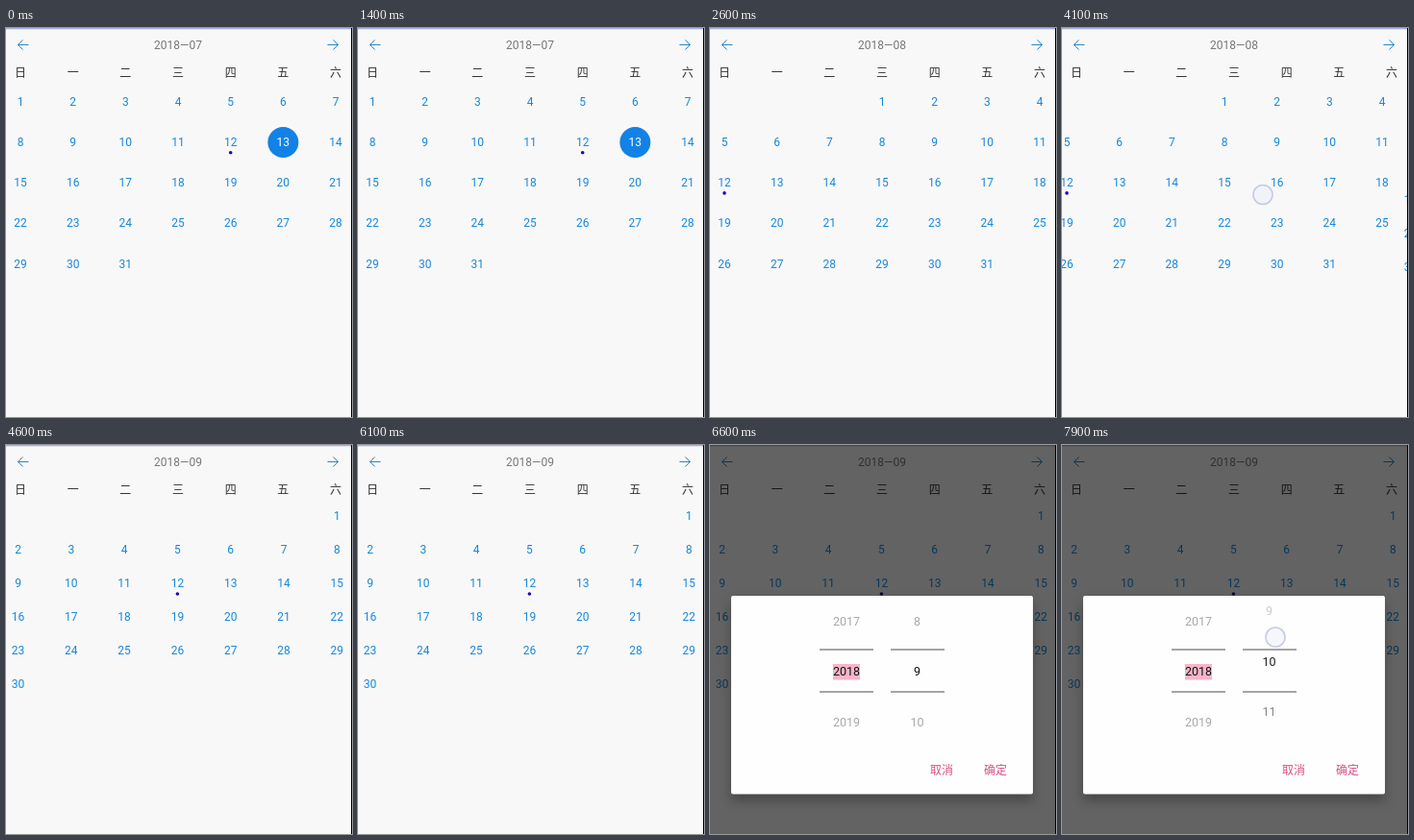
These frames come from a looping animation (360 by 405 pixels, 8000 ms). An HTML page:

```html
<!DOCTYPE html>
<html lang="zh-CN">
<head>
<meta charset="utf-8">
<title>Calendar</title>
<style>
  html, body { margin: 0; width: 100%; height: 100%; overflow: hidden; background: #f8f8f8; }
  svg { display: block; width: 100vw; height: 100vh; }
  text { font: 12px Roboto, "Noto Sans CJK SC", "Noto Sans CJK", sans-serif; text-anchor: middle; }
  .day { fill: #1787d9; }
  .selected { fill: #fff; }
  .weekday { fill: #333; font-weight: 500; }
  .title { fill: #777; }
  .wheel { fill: #111; font-size: 12.5px; }
  .button { fill: #d94f83; font-weight: 500; }
  .arrow { fill: none; stroke: #3585bd; }
  .dialog { filter: drop-shadow(0 7px 6px rgba(0, 0, 0, .28)); }
</style>
</head>
<body>
<svg id="stage" viewBox="0 0 360 405"></svg>
<script>
const LOOP = 8000, TICK = 100, PAGE = 360;
const stage = document.getElementById('stage');

function add(parent, tag, attrs = {}, content = '') {
  const node = document.createElementNS('http://www.w3.org/2000/svg', tag);
  for (const key in attrs) node.setAttribute(key, attrs[key]);
  node.textContent = content;
  return parent.appendChild(node);
}

// Places text with its digits centred on (x, y).
const label = (parent, content, x, y, className) =>
  add(parent, 'text', { x, y: y + 4.3, class: className }, content);

const rect = (parent, x, y, width, height, fill) =>
  add(parent, 'rect', { x, y, width, height, fill });

const months = [
  { days: 31, start: 0, x: 15, y: 76.5, dx: 54.67, dy: 42.2, selected: 13 },
  { days: 31, start: 3, x: 15, y: 76.5, dx: 54.67, dy: 42.2 },
  { days: 30, start: 6, x: 12.5, y: 74, dx: 55.3, dy: 35 }
];

const strip = add(stage, 'g');
months.forEach((month, index) => {
  const page = add(strip, 'g', { transform: `translate(${index * PAGE})` });
  for (let day = 1; day <= month.days; day++) {
    const cell = month.start + day - 1;
    const x = month.x + cell % 7 * month.dx;
    const y = month.y + Math.floor(cell / 7) * month.dy;
    const selected = day === month.selected;
    if (selected) add(page, 'circle', { cx: x, cy: y + .3, r: 16, fill: '#1282e6' });
    label(page, day, x, y, selected ? 'selected' : 'day');
    if (day === 12) add(page, 'circle', { cx: x, cy: y + 11, r: 1.8, fill: '#1800c4' });
  }
});

[...'日一二三四五六'].forEach((name, i) => label(stage, name, 15 + i * 54.67, 47, 'weekday'));
const title = label(stage, '', 179, 17.5, 'title');
add(stage, 'path', { class: 'arrow', d: 'M23.5 17.5H12.5M17.5 12.5l-5 5l5 5' });
add(stage, 'path', { class: 'arrow', d: 'M334.5 17.5H345.5M340.5 12.5l5 5l-5 5' });
rect(stage, 0, 0, 360, 1, '#a9b1dc');
rect(stage, 0, 1, 360, 1, '#dde0f0');

const shade = rect(stage, 0, 0, 360, 405, '#000');
const dialog = add(stage, 'g', { class: 'dialog' });
add(dialog, 'rect', { x: 22, y: 157, width: 314, height: 206.5, rx: 2, fill: '#fefefe' });
for (const x of [114, 188])
  for (const y of [212.2, 256.2]) rect(dialog, x, y, 56, 1.6, '#909090');
rect(dialog, 128, 228, 28, 16.5, '#f8b4c8');

function makeWheel(x, first, last, current) {
  const items = [];
  for (let value = first; value <= last; value++)
    items.push({ offset: (value - current) * 52.4, node: label(dialog, value, x, 0, 'wheel') });
  return scroll => items.forEach(({ offset, node }) => {
    const distance = offset - scroll;
    node.setAttribute('y', 236 + distance + 4.4);
    node.setAttribute('opacity', Math.max(0, Math.min(1, (78.5 - Math.abs(distance)) / 72)));
  });
}
const turnYears = makeWheel(142, 2017, 2019, 2018);
const turnMonths = makeWheel(215.5, 8, 12, 9);
label(dialog, '取消', 241, 338.5, 'button');
label(dialog, '确定', 297, 338.5, 'button');

const ring = add(stage, 'circle', { r: 10, fill: '#e8eaf8', 'fill-opacity': .35, stroke: '#c6cbe3', 'stroke-width': 1.6 });
rect(stage, 359, 0, 1, 405, '#000');

// Swipes: slow pull, release, then settling on the next page.
const swipes = [
  { start: 2000, steps: [14, 118, 260, 325, 349, 357, 360] },
  { start: 4100, steps: [10, 112, 255, 333, 356, 360] }
];

// Finger position and opacity, by time.
const touches = {
  2000: [300, 158, 1], 2100: [205, 155, 1], 2200: [157.5, 154.5, .4],
  4100: [209, 173.5, 1], 4200: [110, 170, 1], 4300: [75, 169, .4],
  5900: [179.5, 22.5, 1], 6000: [179.5, 22.5, .4],
  7500: [216, 263, 1], 7600: [222, 246, 1], 7700: [227, 228, 1], 7800: [225, 212, 1], 7900: [222, 200, 1]
};

function scrollAt(time) {
  let scroll = 0;
  for (const { start, steps } of swipes) {
    const step = Math.min((time - start) / TICK, steps.length - 1);
    if (step >= 0) scroll += steps[step];
  }
  return scroll;
}

function draw(now) {
  const time = Math.floor(now % LOOP / TICK) * TICK;
  const scroll = scrollAt(time);
  strip.setAttribute('transform', `translate(${-scroll})`);
  title.textContent = `2018—0${7 + Math.round(scroll / PAGE)}`;

  const opening = time === 6500;
  shade.setAttribute('opacity', time < 6500 ? 0 : opening ? .18 : .6);
  dialog.setAttribute('opacity', time < 6500 ? 0 : opening ? .84 : 1);

  const [x, y, opacity] = touches[time] || [0, 0, 0];
  ring.setAttribute('cx', x);
  ring.setAttribute('cy', y);
  ring.setAttribute('opacity', opacity);
  turnYears(0);
  turnMonths(time >= 7500 ? 263 - y : 0);
}

let origin;
function frame(now) {
  origin ??= now;
  draw(now - origin);
  requestAnimationFrame(frame);
}
draw(0);
requestAnimationFrame(frame);
</script>
</body>
</html>
```
